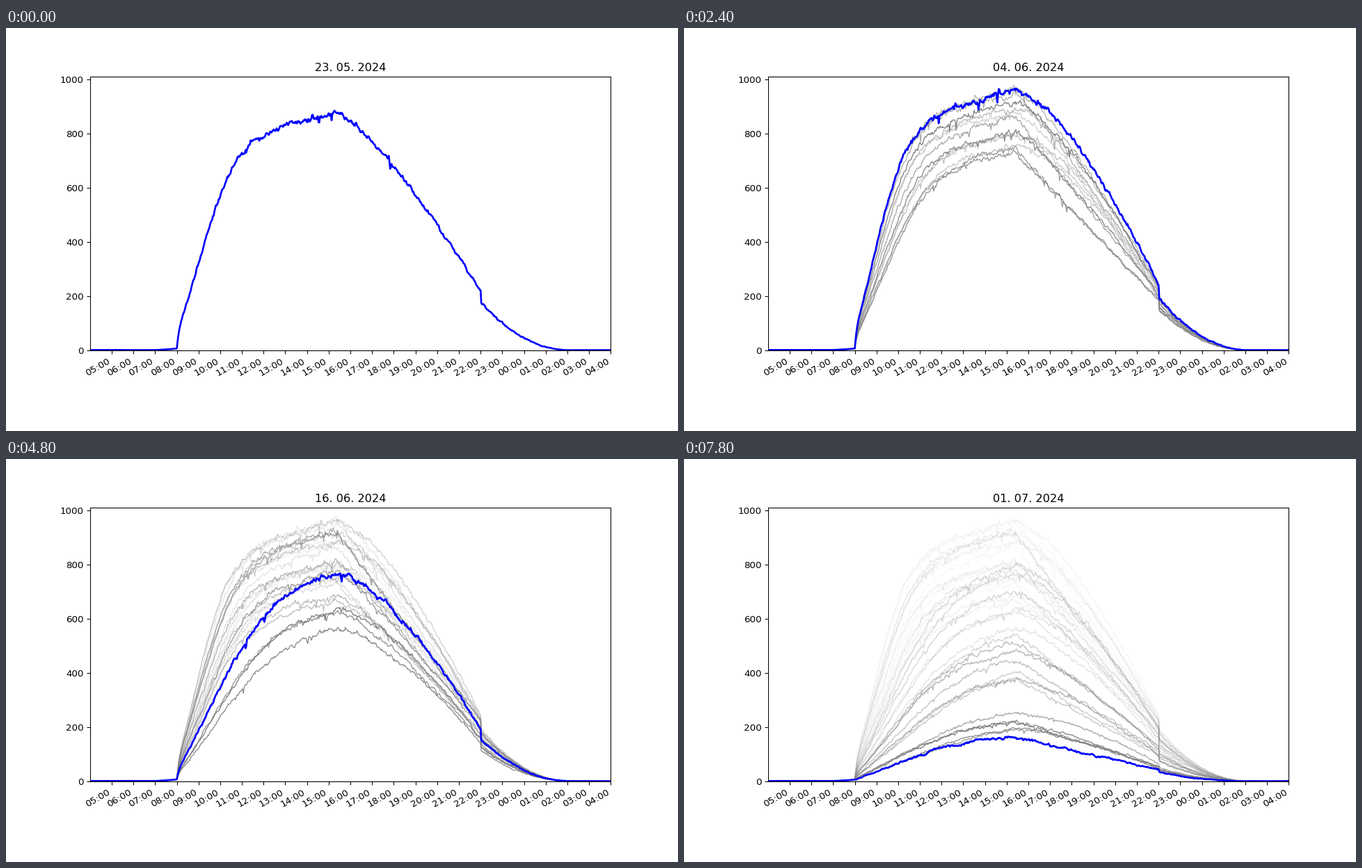
A matplotlib script that plays this animation: 966x580 px, repeating every 8000 ms.

```python
import numpy as np
import matplotlib.pyplot as plt
from matplotlib.animation import FuncAnimation

DAYS = 40
OPEN, PEAK, CLOSE, END = 8, 15.4, 22, 26.1
FADE = .91
T = np.linspace(4, 28, 721)


def wave(day, period, crest):
    return np.cos(2 * np.pi * (day - crest) / period)


def morning(t, pace):
    """Quick rise after opening that bends into a slow climb, 1 at the peak hour."""
    def climb(hour):
        x = np.clip(hour, OPEN, PEAK) - OPEN
        x = x + .2 * (1 - np.exp(-x / .08)) * np.exp(-x)
        u = pace * x
        return .86 * u / (1 + u ** 4) ** .25 + .14 * x / (PEAK - OPEN)
    return climb(t) / climb(PEAK)


def evening(t, bend):
    """Falling factor after the peak, with a step at closing time and a fading tail."""
    u = np.clip((t - PEAK) / (CLOSE - PEAK), 0, 1)
    fall = 1 - .75 * u ** bend
    tail = .2 * np.clip((END - t) / (END - CLOSE), 0, 1) ** 2
    return np.where(t <= CLOSE, fall, tail)


def jitter(rng, keep):
    """Correlated noise with unit variance."""
    out = np.zeros(len(T))
    for i, step in enumerate(rng.normal(size=len(T))):
        out[i] = keep * out[i - 1] + step * np.sqrt(1 - keep ** 2)
    return out


def curve(day):
    rng = np.random.default_rng(500 + day)
    # The season sinks slowly while a roughly weekly wave takes its share
    season = np.interp(day, [0, 7, 12, 19, 24, 32, 39], [935, 975, 955, 930, 840, 483, 174])
    quiet = (1 + wave(day, 6.6, 2)) / 2
    peak = season * (1 - (.18 + .008 * day) * quiet)
    pace = np.interp(day, [0, 17, 24, 39], [.42, .41, .25, .21]) * (1 - .3 * quiet)
    bend = 1.25 + .3 * wave(day, 10.5, 23.5)

    idle = np.interp(T, [4, 7, 7.6, OPEN, OPEN + .05], [1.5, 1.5, 4, 7, 1])
    y = idle + peak * morning(T, pace) * evening(T, bend) * (T > OPEN)
    noise = .9 * jitter(rng, .6) + .8 * jitter(rng, .95)
    y += .2 * np.sqrt(y) * noise * np.where((T > OPEN + .2) & (T < END), 1, .4)
    for hour in rng.uniform(11, 18, 3):
        y -= .035 * peak * np.exp(-((T - hour) / .025) ** 2)
    return np.maximum(y, 0)


def date(day):
    n, month = 23 + day, 5
    for length in (31, 30):
        if n > length:
            n, month = n - length, month + 1
    return f"{n:02d}. {month:02d}. 2024"


plt.rcParams.update({"font.family": "DejaVu Sans", "font.size": 10.06})
fig, ax = plt.subplots(figsize=(966 / 96, 580 / 96), dpi=96)
fig.subplots_adjust(left=.125, right=.9, bottom=.2, top=.88)
ax.set_xlim(4, 28)
ax.set_ylim(0, 1010)
ax.set_xticks(range(5, 29), [f"{h % 24:02d}:00" for h in range(5, 29)], rotation=30, ha="right")
ax.set_yticks(range(0, 1001, 200))
title = ax.set_title(date(0))
lines = [ax.plot(T, curve(day))[0] for day in range(DAYS)]


def update(today):
    title.set_text(date(today))
    for day, line in enumerate(lines):
        age = today - day
        line.set_visible(age >= 0)
        if age == 0:
            line.set(color="blue", linewidth=2, alpha=1)
        elif age > 0:
            line.set(color="gray", linewidth=1, alpha=FADE ** (age - 1))
    return [title, *lines]


anim = FuncAnimation(fig, update, frames=DAYS, init_func=lambda: update(0),
                     interval=200, repeat=True, repeat_delay=0, blit=False)
plt.show()
```
